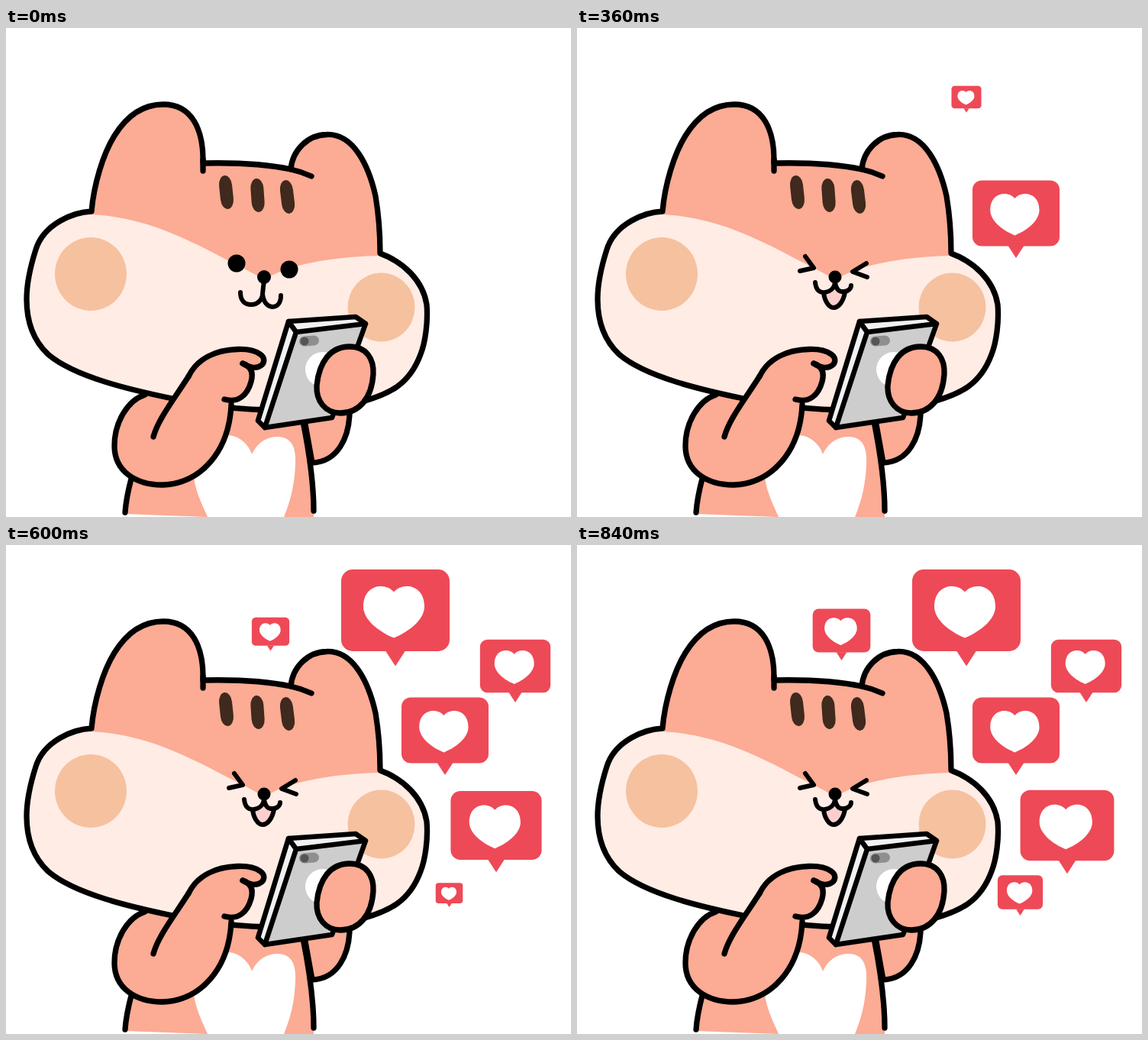
An HTML page for the animation above (0.9 s loop, 740 px wide and 640 px high).

```html
<!DOCTYPE html>
<html lang="en">
<head>
<meta charset="utf-8">
<title>Likes</title>
<style>
  html, body { margin: 0; width: 100%; height: 100%; overflow: hidden; background: #fff; }
  svg { display: block; width: 740px; height: 640px; }
  .ink { fill: none; stroke: #000; stroke-width: 7.3; stroke-linecap: round; stroke-linejoin: round; }
  .thin { stroke-width: 6; }
  .coral { fill: #fcab94; }
  .pale { fill: #ffece5; }
  .cheek { fill: #f6c19f; }
  .stripes { fill: #40291d; }
</style>
</head>
<body>
<svg viewBox="0 0 740 640">
  <defs>
    <path id="skull" d="M112 240C115 205 127 165 142 141C160 112 183 100 206 100C243 100 259 132 258 177C300 176 340 178 373 185C375 160 395 140 420 139.500C455 138 475 180 484 220C489 250 490 270 490 295C520 306 546 330 551 362C553 385 549 412 543 427C528 468 500 479 470 488C440 500 400 503 345 500C300 499 260 494 218 485C165 474 90 457 55 427C37 410 27 385 27 355C27 335 31 315 39 290C50 255 90 241 112 240Z"/>
    <clipPath id="skullClip"><use href="#skull"/></clipPath>
    <g id="fist">
      <path d="M310 439C317 444 328 447 335 441C339 437 339 431 333 427C326 422 314 420 303 420.500C275 421.500 251 432 239 456"/>
      <path d="M310 439C322 443 324 452 321 463C316 481 304 491 286 486"/>
    </g>
    <g id="bubble">
      <g fill="#ee4957">
        <rect x="-71" y="-53.5" width="142" height="107" rx="15"/>
        <path d="M-13 53H13L0 73Z"/>
      </g>
      <path fill="#fff" d="M-2 -24C-12 -37 -42 -35 -42 -5C-42 12 -22 28 -2 36C18 28 38 12 38 -5C38 -35 8 -37 -2 -24Z"/>
    </g>
    <rect id="stripe" x="-8.5" y="-22" width="17" height="44" rx="8.5" ry="13"/>
  </defs>

  <!-- body -->
  <path id="sleeve" class="ink" style="fill:#fcab94"/>
  <path class="coral" d="M182 470L389 490V515C398 560 403 598 403 640H264L156 636C157 620 160 605 164 590Z"/>
  <path fill="#fff" d="M322 558C318 545 305 533 290 533C262 533 243 556 246 588C248 605 255 620 264 640H364C372 620 378 600 379 570C380 550 375 537 358 535C345 534 330 540 322 558Z"/>
  <path class="ink" d="M164 590C160 605 157 620 156 634M389 515C398 560 403 598 403 632"/>

  <!-- head -->
  <use href="#skull" class="coral"/>
  <g clip-path="url(#skullClip)">
    <path class="pale" d="M0 244H112C180 248 230 272 290 304C310 314 325 321 338 330C355 318 400 300 490 298H600V520H0Z"/>
  </g>
  <ellipse class="cheek" cx="111" cy="322" rx="47" ry="48"/>
  <ellipse class="cheek" cx="491.5" cy="365.5" rx="44" ry="45"/>
  <use href="#skull" class="ink"/>
  <path class="ink" d="M258 172V187M373 185Q387 188 400 194"/>
  <g class="stripes">
    <use href="#stripe" transform="translate(288.5 215) rotate(-6)"/>
    <use href="#stripe" transform="translate(329.5 219) rotate(-4)"/>
    <use href="#stripe" transform="translate(368.5 221) rotate(-7)"/>
  </g>

  <g id="calm">
    <circle cx="302" cy="308" r="11.500"/>
    <circle cx="371" cy="316" r="11.500"/>
    <circle cx="338" cy="326" r="9"/>
    <path class="ink thin" d="M307 346C307 357 313 362 321 362C330 362 336 355 336 348L338 330L336 348C337 359 343 365 349 365C356 365 360 359 360 350"/>
  </g>
  <g id="happy">
    <path class="ink thin" d="M299 299L310 314L292 318M379 308L361 319L380 326"/>
    <path class="ink thin" style="fill:#fccfce" d="M323 346C324 357 330 366 336 366C343 366 349 357 351 346L338 338Z"/>
    <path class="pale" d="M312 333C313 344 319 347 325 346C331 345 337 341 338 333C339 341 343 346 349 345C355 345 359 341 359 337Z"/>
    <path class="ink thin" d="M312 333C313 344 319 347 325 346C331 345 337 341 338 333C339 341 343 346 349 345C355 345 359 341 359 337"/>
    <circle cx="338" cy="326" r="8.500"/>
  </g>

  <!-- tapping arm, two poses -->
  <g id="rest">
    <path class="coral" d="M182 482C160 490 142 515 142 547C142 580 170 598 205 598C255 596 292 555 295 493L300 488C312 484 319 474 321 463C324 452 322 446 319 443C328 446 338 444 338 436C337 425 325 420.500 303 420.500C275 421.500 251 432 239 456L217 489Z"/>
    <path class="ink" d="M182 480C160 487 142 515 142 547C142 580 170 598 205 598C255 596 292 555 295 493M193 535C199 512 222 483 239 456"/>
    <use href="#fist" class="ink"/>
  </g>
  <g id="tap">
    <path class="coral" d="M182 482C160 490 142 515 142 547C142 580 170 596 201 595C262 592 305 545 309 488C328 490 345 475 347 450L362 445V432C350 420 335 420 320 420C300 422 287 425 276 439C262 456 245 471 227 490Z"/>
    <use href="#fist" class="ink" opacity=".5"/>
    <path class="ink" d="M182 480C160 487 142 515 142 547C142 580 170 596 201 595C262 592 305 545 309 488C328 491 345 478 347 459C347 454 347 450 345 447M201 529C209 507 240 478 262 455C276 437 284 424 304 422C324 418 344 420 356 431M333 440C339 445 346 446 354 444"/>
    <path class="ink thin" d="M241 441L290 447M246 453L278 457"/>
  </g>

  <!-- phone and holding hand -->
  <g id="phone">
    <path fill="#f1f1f1" d="M370 384L458 378L471 387L380 398L339 523L330 514Z"/>
    <path fill="#cdcdcd" d="M380 398L471 387L427 510L339 523Z"/>
    <circle cx="415" cy="447" r="23" fill="#fff"/>
    <rect x="384" y="403" width="26" height="13" rx="6.500" fill="#8f8f8f" transform="rotate(-4 397 409.500)"/>
    <circle cx="391" cy="410" r="5.500" fill="#555"/>
    <path class="ink" style="stroke-width:6.6" d="M370 384L458 378L471 387L427 510L339 523L330 514ZL380 398L471 387M380 398L339 523"/>
    <path class="ink" style="fill:#fcab94" d="M450 417C472 417 482 433 481 453C479 485 462 504 438 504C418 504 406 488 407 468C410 437 425 417 450 417Z"/>
  </g>

  <g id="bubbles"></g>
</svg>
<script>
const STEP = 60, STEPS = 15, GROWTH = 0.4;
const $ = id => document.getElementById(id);

// x, y, size, first step, scale at that step, vertical growth origin
const bubbles = [
  [575, 242.5, 0.803, 3, 0.49, 4],
  [510, 85.5, 1, 6, 0.275, 7],
  [667, 158.5, 0.65, 7, 0.2, 10],
  [642, 367, 0.865, 8, 0.17, 0],
  [580.5, 454.5, 0.417, 9, 0.2, 7],
  [346.5, 112, 0.533, 9, 0.25, 7]
].map(([x, y, size, first, from, origin]) => {
  const el = document.createElementNS("http://www.w3.org/2000/svg", "use");
  el.setAttribute("href", "#bubble");
  $("bubbles").append(el);
  return { el, x, y, size, first, from, origin };
});

const show = (el, on) => { el.style.display = on ? "" : "none"; };

function pose(step) {
  const tapping = step % 2 === 1;
  const happy = step >= 3;
  show($("rest"), !tapping);
  show($("tap"), tapping);
  show($("calm"), !happy);
  show($("happy"), happy);
  $("phone").setAttribute("transform", `translate(${tapping ? 5.5 : 0} 0)`);
  $("sleeve").setAttribute("d", `M385 480H${tapping ? 453 : 450}V505C449 535 435 568 401 569Z`);

  for (const b of bubbles) {
    const age = step - b.first;
    const grow = Math.min(1, b.from + GROWTH * age);
    show(b.el, age >= 0);
    b.el.setAttribute("transform",
      `translate(${b.x} ${b.y + b.origin * b.size * (1 - grow)}) scale(${b.size * Math.max(0, grow)})`);
  }
}

let last = -1;
function tick(now) {
  const step = Math.floor(now / STEP) % STEPS;
  if (step !== last) pose(last = step);
  requestAnimationFrame(tick);
}
pose(0);
requestAnimationFrame(tick);
</script>
</body>
</html>
```
